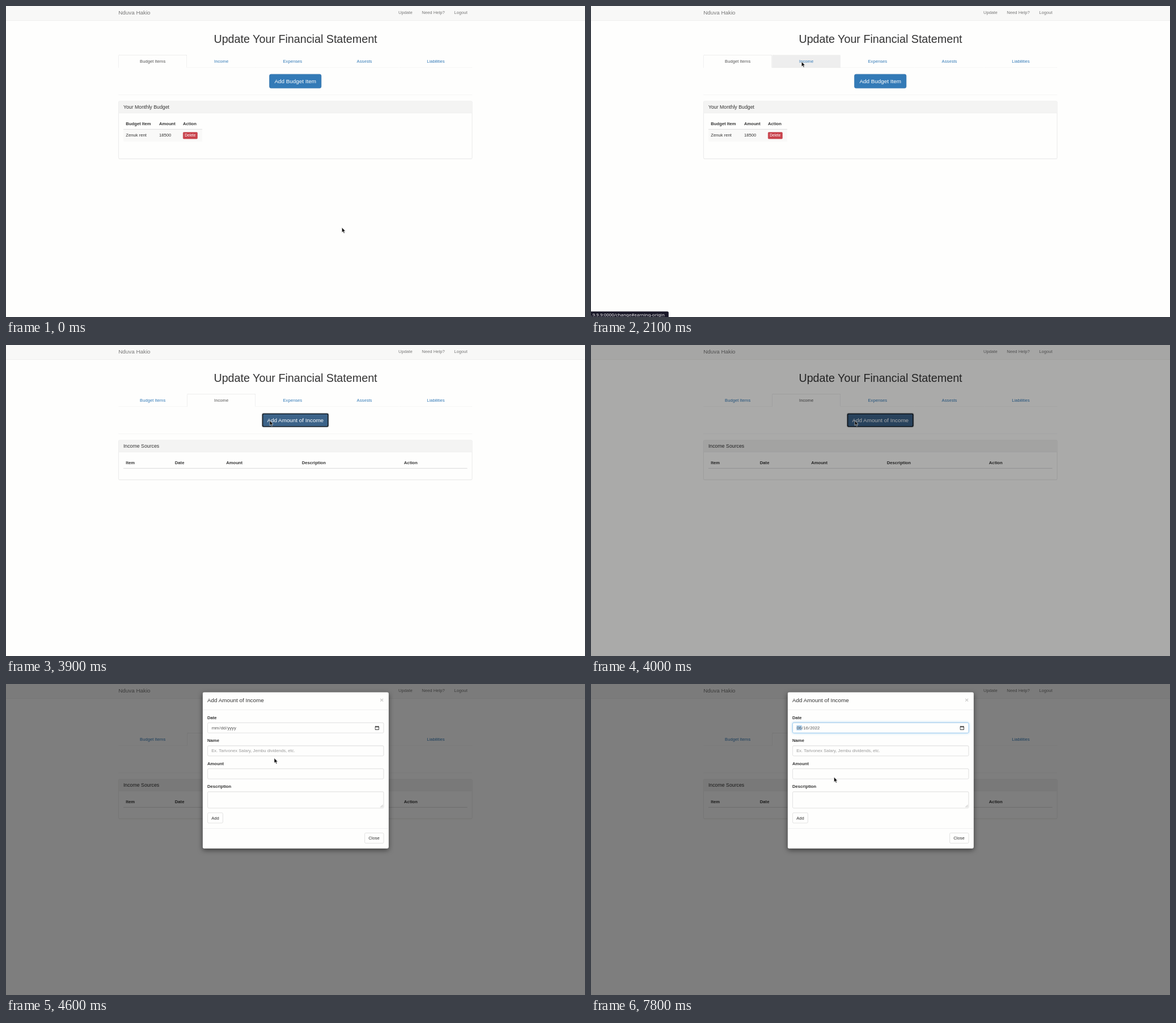
Write an HTML page that moves like this. It is 1021 by 548 pixels and loops after 8 s.

```html
<!DOCTYPE html>
<html lang="en">
<head>
<meta charset="utf-8">
<title>Financial statement</title>
<style>
* { box-sizing: border-box; }
html, body { margin: 0; width: 100%; height: 100%; overflow: hidden; background: #fefefd; }
.page {
  position: absolute; left: 0; top: -.3px; width: 1866px; height: 1003px; overflow: hidden;
  transform: scale(.54745); transform-origin: 0 0; background: #fefefd;
  font: 14px/20px "Liberation Sans", Arial, sans-serif; color: #333; white-space: nowrap;
}
.abs, .page > *, .pane > *, .picker > * { position: absolute; }
.bar { left: 0; top: -5px; width: 100%; height: 52px; background: #f8f8f7; border-bottom: 1px solid #e7e7e6; color: #777; }
.bar span { position: absolute; top: 16px; }
.bar .brand { left: 362px; font-size: 18px; }
h1 { left: 0; top: 86.6px; width: 1865px; margin: 0; text-align: center; font-size: 36px; font-weight: 500; line-height: 39.6px; }
.tabs { left: 362px; top: 156.6px; width: 1140px; height: 42px; display: flex; }
.tabs div { padding: 10px 0; text-align: center; color: #337ab7; border: 1px solid transparent; border-bottom-color: #ddd; border-radius: 4px 4px 0 0; }
.tabs .hover { background: #eee; border-color: #eee #eee #ddd; }
.tabs .active { background: #fefefd; color: #555; border-color: #ddd #ddd transparent; }
.pane { left: 362px; top: 218.6px; width: 1140px; height: 300px; }
.big { left: 50%; transform: translateX(-50%); height: 46px; padding: 10px 16px; font-size: 18px; line-height: 24px; color: #fff; background: #337ab7; border: 1px solid #2e6da4; border-radius: 6px; }
.big.hover { background: #286090; border-color: #204d74; }
.big.focus { background: #3c6389; border-color: #ddd; box-shadow: inset 0 0 0 3px #101010, 0 0 0 1px #ddd; }
.rule { top: 66px; width: 100%; height: 1px; background: #eee; }
.panel { top: 87px; width: 100%; border: 1px solid #ddd; border-radius: 4px; box-shadow: 0 1px 1px rgba(0,0,0,.05); }
.panel h3 { margin: 0; padding: 10px 15px; height: 38.6px; font-size: 16px; font-weight: 500; line-height: 17.6px; background: #f4f4f3; border-bottom: 1px solid #ddd; border-radius: 3px 3px 0 0; }
.head { left: 16px; top: 141.6px; height: 38px; border-bottom: 2px solid #ddd; font-weight: bold; }
.head span, .row span { position: absolute; top: 8px; }
.row { left: 16px; top: 179.6px; height: 38px; background: #f9f9f8; }
.row .delete { padding: 1px 5px; font-size: 12px; line-height: 18px; color: #fff; background: #c9434c; border: 1px solid #c13c45; border-radius: 3px; height: 22px; }
.status { left: 0; top: 983px; width: 250px; height: 22px; padding-left: 1px; overflow: hidden; background: #1a1929; color: #f2f2f2; border-radius: 0 4px 0 0; font: 14.5px/20px "Noto Sans", sans-serif; }
.backdrop { inset: 0; background: #000; }
.modal { left: 632.5px; top: 26px; width: 600px; height: 503.7px; background: #fefefd; border: 1px solid rgba(0,0,0,.2); border-radius: 6px; box-shadow: 0 5px 15px rgba(0,0,0,.5); }
.modal > * { position: absolute; }
.modal h4 { left: 15px; top: 14px; margin: 0; font-size: 18px; font-weight: 500; line-height: 25.7px; }
.modal .x { right: 15px; top: 13px; font-size: 21px; font-weight: bold; line-height: 21px; opacity: .2; color: #000; }
.line { left: 0; width: 100%; height: 1px; background: #e5e5e5; }
.modal label { left: 15px; font-weight: bold; }
.field { left: 15px; width: 568px; height: 34px; padding: 6px 12px; color: #555; background: #fefefd; border: 1px solid #ccc; border-radius: 4px; box-shadow: inset 0 1px 1px rgba(0,0,0,.075); }
.field.focus { border-color: #66afe9; box-shadow: inset 0 1px 1px rgba(0,0,0,.075), 0 0 8px rgba(102,175,233,.6); }
.field.focus i:first-child { background: #abcfee; }
.field i { font-style: normal; padding: 0 1px; }
.field svg { position: absolute; }
.hint { color: #999; }
.btn { height: 34px; padding: 6px 12px; border: 1px solid #ccc; border-radius: 4px; background: #fefefd; }
.picker { left: 647.5px; top: 157.3px; width: 218px; height: 280px; background: #fefefd; border: 1px solid #b9b9b9; box-shadow: 0 2px 5px rgba(0,0,0,.25); font-size: 12px; color: #111; }
.picker svg { inset: 0; overflow: visible; }
.picker .cell { width: 28px; height: 28px; line-height: 28px; text-align: center; }
.picker .other { color: #808080; }
.picker .chosen { background: #1a73e8; color: #fff; font-weight: bold; line-height: 24px; border: 2px solid #000; }
.picker .link { top: 248px; color: #2375bb; }
.cursor { left: 0; top: 0; width: 1px; height: 1px; overflow: visible; }
</style>
</head>
<body>
<div class="page">
  <div class="bar">
    <span class="brand">Nduva Hakio</span>
    <span style="left:1264px">Update</span><span style="left:1339.5px">Need Help?</span><span style="left:1443.5px">Logout</span>
  </div>
  <h1>Update Your Financial Statement</h1>
  <div class="tabs">
    <div style="width:221px">Budget Items</div><div style="width:221px">Income</div><div style="width:238px">Expenses</div><div style="width:225px">Assests</div><div style="width:235px">Liabilities</div>
  </div>

  <div class="pane" id="budget">
    <div class="big">Add Budget Item</div>
    <div class="rule"></div>
    <div class="panel" style="height:186.6px"><h3>Your Monthly Budget</h3></div>
    <div class="head" style="width:254px"><span style="left:8px">Budget Item</span><span style="left:115px">Amount</span><span style="left:192px">Action</span></div>
    <div class="row" style="width:254px"><span style="left:8px">Zenuk rent</span><span style="left:115px">18500</span><span class="delete" style="left:192px">Delete</span></div>
  </div>

  <div class="pane" id="income">
    <div class="big" id="addIncome">Add Amount of Income</div>
    <div class="rule"></div>
    <div class="panel" style="height:128.6px"><h3>Income Sources</h3></div>
    <div class="head" style="width:1108px"><span style="left:8px">Item</span><span style="left:166px">Date</span><span style="left:331px">Amount</span><span style="left:575px">Description</span><span style="left:904px">Action</span></div>
  </div>

  <div class="status">.9.9.9:0000/change#earning-origin</div>
  <div class="backdrop"></div>

  <div class="modal">
    <h4>Add Amount of Income</h4><span class="x">×</span>
    <div class="line" style="top:55.7px"></div>
    <label style="top:71px">Date</label>
    <div class="field" id="date" style="top:96.7px"><span></span>
      <svg style="left:538px;top:9px" width="14" height="15" fill="none" stroke="#111" stroke-width="1.5"><path d="M1.2 3H12.8V13H1.2ZM1.2 4.3H12.8M3.6 .6V3M10.4 .6V3"/></svg>
    </div>
    <label style="top:145px">Name</label>
    <div class="field hint" style="top:170.7px">Ex. Tarivonex Salary, Jembu dividends, etc.</div>
    <label style="top:219px">Amount</label>
    <div class="field" style="top:244.7px"></div>
    <label style="top:293px">Description</label>
    <div class="field" style="top:318.7px;height:54px">
      <svg style="right:1px;bottom:1px" width="10" height="10" stroke="#777"><path d="M1 9L9 1M5.5 9L9 5.5"/></svg>
    </div>
    <div class="btn" style="left:15px;top:386.7px">Add</div>
    <div class="line" style="top:436.7px"></div>
    <div class="btn" style="right:15px;top:452px">Close</div>
  </div>

  <div class="picker">
    <b style="left:10px;top:11px">June 2022</b>
    <svg width="1" height="1" fill="none" stroke="#222" stroke-width="1.4">
      <path fill="#222" stroke="none" d="M71 19.5h8l-4 4z"/>
      <path d="M160 31V14.500M153 21.500L160 14.500L167 21.500M192 14.500V31M185 24L192 31L199 24"/>
    </svg>
    <span class="link" style="left:20px">Clear</span><span class="link" style="right:20px">Today</span>
  </div>

  <svg class="cursor">
    <path id="arrow" d="M0 0V16L3.700 12.700L6.300 18.500L9 17.300L6.500 11.700H11.300Z" fill="#111" stroke="#fff" stroke-width="1"/>
    <g id="beam" fill="none"><path d="M-3-8H3M0-8V8M-3 8H3" stroke="#fff" stroke-width="4"/><path d="M-3-8H3M0-8V8M-3 8H3" stroke="#111" stroke-width="1.500"/></g>
  </svg>
</div>
<script>
const SCALE = .54745, LOOP = 8000, STEP = 100;
const $ = s => document.querySelector(s);
const clamp = v => Math.max(0, Math.min(1, v));
const ramp = (t, from, to) => clamp((t - from) / (to - from));
const smooth = p => p * p * (3 - 2 * p);

// Pointer moves: start, end, x, y on the stage
const startPoint = [592.3, 390.3];
const moves = [
  [500, 600, 585.5, 393], [700, 900, 543, 369], [1000, 1400, 390.3, 147],
  [1500, 2100, 371.3, 98], [3100, 3700, 465, 133], [4500, 5300, 651, 75],
  [5800, 5900, 635.5, 87], [5900, 6700, 425, 161.5], [6700, 6900, 426.5, 163],
  [7200, 7300, 428.5, 164]
];
function pointer(t) {
  let [x, y] = startPoint;
  for (const [from, to, nx, ny] of moves) {
    const p = smooth(ramp(t, from, to));
    x += (nx - x) * p;
    y += (ny - y) * p;
  }
  return [x, y];
}

// CSS "ease-out": cubic-bezier(0, 0, .58, 1)
function easeOut(p) {
  let lo = 0, hi = 1;
  for (let i = 0; i < 20; i++) {
    const u = (lo + hi) / 2;
    if (1.74 * u * u * (1 - u) + u ** 3 < p) lo = u; else hi = u;
  }
  return lo * lo * (3 - 2 * lo);
}

const picker = $('.picker');
function cell(text, col, top, kind = '') {
  const el = document.createElement('div');
  el.className = 'cell ' + kind;
  el.textContent = text;
  el.style.left = 9.5 + col * 28 + 'px';
  el.style.top = top + 'px';
  picker.append(el);
}
[...'SMTWTFS'].forEach((d, i) => cell(d, i, 44));
for (let i = 0; i < 42; i++) {
  const june = i >= 3 && i < 33;
  const day = i < 3 ? 29 + i : june ? i - 2 : i - 32;
  cell(day, i % 7, 73 + 28 * Math.floor(i / 7), !june ? 'other' : day === 16 ? 'chosen' : '');
}

const tabs = $('.tabs').children, button = $('#addIncome'), date = $('#date');
const dateText = date.querySelector('span');
const show = (el, on) => { el.style.visibility = on ? 'visible' : 'hidden'; };
const dateHtml = parts => parts.map(p => `<i>${p}</i>`).join('/');
const emptyDate = dateHtml(['mm', 'dd', 'yyyy']), fullDate = dateHtml(['06', '16', '2022']);
let shownDate = '';

function render(t) {
  const [x, y] = pointer(t);
  const switched = t >= 2500;

  tabs[0].classList.toggle('active', !switched);
  tabs[1].classList.toggle('active', switched);
  tabs[1].classList.toggle('hover', !switched && t > 1500 && y < 108);
  $('#budget').style.opacity = 1 - ramp(t, 2460, 2610);
  $('#income').style.opacity = ramp(t, 2610, 2760);
  show($('.status'), t >= 2000 && t < 3400);

  button.classList.toggle('hover', t > 3100 && x > 451 && y > 120);
  button.classList.toggle('focus', t >= 3800);

  $('.backdrop').style.opacity = .5 * ramp(t, 3900, 4050);
  const modal = $('.modal');
  modal.style.opacity = ramp(t, 4050, 4200);
  modal.style.transform = `translateY(${-126 * (1 - easeOut(ramp(t, 4050, 4350)))}px)`;

  date.classList.toggle('focus', t >= 5500);
  const text = t >= 7800 ? fullDate : emptyDate;
  if (text !== shownDate) dateText.innerHTML = shownDate = text;
  show(picker, t >= 5600 && t < 7800);

  const overText = y > 108 && y < 127 || y < 86 && x < 648;
  const beam = t >= 4100 && t < 4300 || t >= 4300 && t < 5400 && overText;
  show($('#beam'), beam);
  show($('#arrow'), !beam);
  $('.cursor').style.transform = `translate(${x / SCALE}px, ${y / SCALE}px)`;
}

const begin = performance.now();
function tick() {
  const t = (performance.now() - begin) % LOOP;
  render(Math.floor(t / STEP) * STEP);
  requestAnimationFrame(tick);
}
tick();
</script>
</body>
</html>
```
